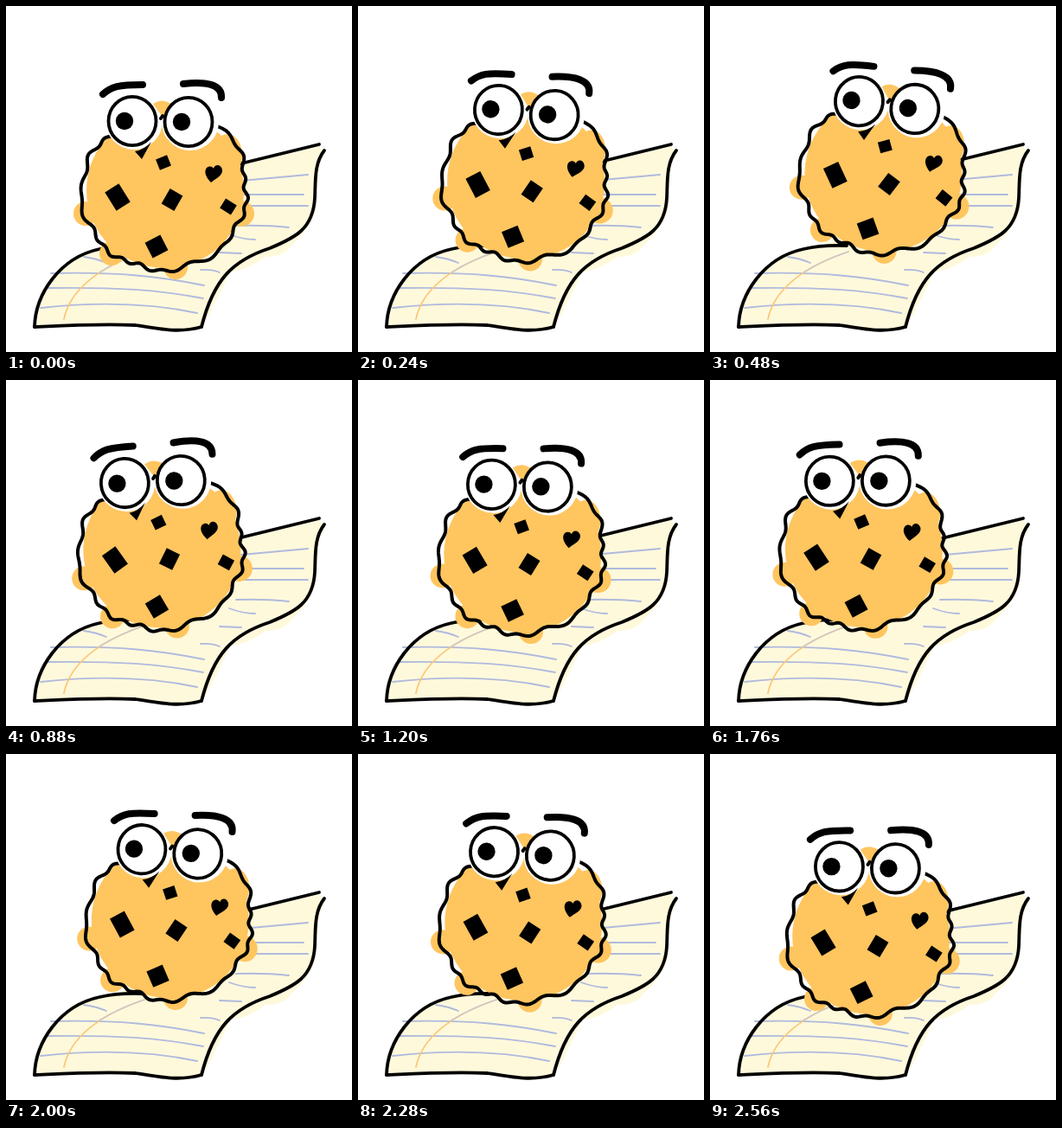
Write an HTML page with a canvas that moves like this. It is 400 px wide and 400 px high and loops after 2.6 s.

```html
<!DOCTYPE html>
<html lang="en">
<head>
<meta charset="utf-8">
<title>Dancing cookie</title>
<style>
  html, body { margin: 0; width: 100%; height: 100%; overflow: hidden; background: #fff; }
  canvas { display: block; width: 100vmin; height: 100vmin; }
</style>
</head>
<body>
<canvas id="stage" width="400" height="400"></canvas>
<script>
const ctx = document.getElementById('stage').getContext('2d');
const LOOP = 2600, STEP = 40, RAD = Math.PI / 180;
const INK = '#000', DOUGH = '#ffc55f', PAPER = '#fff9dc', RULE = '#b0badd', MARGIN = '#fbc878';
const PIVOT = { x: 192, y: 224 };

const poses = [
  { t: 0, x: 192, y: 224, tilt: 0 },
  { t: 480, x: 207, y: 206, tilt: 7 },
  { t: 880, x: 189, y: 207, tilt: -3.6 },
  { t: 1200, x: 198, y: 213, tilt: 1.5 },
  { t: 1520, x: 200, y: 206, tilt: -6.4 },
  { t: 1740, x: 186, y: 207, tilt: -1.5 },
  { t: 2000, x: 197, y: 204, tilt: 3.7 },
  { t: 2240, x: 199, y: 205, tilt: 3.2 },
  { t: 2560, x: 194, y: 222, tilt: 0.9 }
];

function keyPose(i) {
  const turn = Math.floor(i / poses.length);
  const pose = poses[i - turn * poses.length];
  return { ...pose, t: pose.t + turn * LOOP };
}

// Smooth closed curve through the poses
function poseAt(t) {
  const i = poses.findLastIndex(p => p.t <= t);
  const [a, b, c, d] = [i - 1, i, i + 1, i + 2].map(keyPose);
  const span = c.t - b.t, u = (t - b.t) / span;
  const blend = k => {
    const m0 = (c[k] - a[k]) / (c.t - a.t) * span;
    const m1 = (d[k] - b[k]) / (d.t - b.t) * span;
    return b[k] + (c[k] - b[k]) * u * u * (3 - 2 * u)
      + u * (1 - u) * ((1 - u) * m0 - u * m1);
  };
  return { x: blend('x'), y: blend('y'), tilt: blend('tilt') };
}

const path = d => new Path2D(d);

function stroke(shape, width, color = INK) {
  ctx.lineWidth = width;
  ctx.strokeStyle = color;
  ctx.stroke(shape);
}

function fill(shape, color = INK) {
  ctx.fillStyle = color;
  ctx.fill(shape);
}

function oval(x, y, rx, ry = rx) {
  const p = new Path2D();
  p.ellipse(x, y, rx, ry, 0, 0, Math.PI * 2);
  return p;
}

// Wavy rim, open at the top behind the eyes
function makeCrust() {
  const p = new Path2D();
  for (let deg = -53; deg <= 229; deg++) {
    const a = deg * RAD;
    const shoulder = 10 * Math.max(0, Math.cos(a + 53 * RAD)) ** 6;
    const wave = 2 * Math.sin(20 * a + 2 * Math.sin(3 * a)) + 1.8 * Math.sin(9 * a);
    const swell = shoulder + wave;
    p.lineTo(182 + (95 + swell) * Math.cos(a), 216 + (89 + swell) * Math.sin(a));
  }
  return p;
}

function chip(x, y, w, h, deg) {
  ctx.save();
  ctx.translate(x, y);
  ctx.rotate(deg * RAD);
  ctx.fillStyle = INK;
  ctx.fillRect(-w / 2, -h / 2, w, h);
  ctx.restore();
}

const sheet = path('M34 371C34 333 62 288 112 280C170 274 215 196 272 183L362 162L369 170' +
  'C356 190 362 222 357 240Q348 262 330 277Q322 290 300 290Q282 304 259 308Q246 336 227 372' +
  'Q205 378 180 373Q150 367 34 371Z');
const sheetEdges = [
  path('M33 371C34 333 62 291 108 281Q128 276 158 277'),
  path('M268 183L362 160'),
  path('M368 167C356 182 358 203 357 222C355 258 334 268 305 280C262 294 240 316 226 371'),
  path('M33 371C75 369 110 367 150 369C180 374 202 378 226 371')
];
const rules = path('M90 290Q105 292 116 297M52 309C130 307 180 313 229 323' +
  'M48 326C130 325 175 328 228 338M40 349C95 343 160 342 221 355' +
  'M225 305Q238 304 247 308M272 202L349 195M270 218L344 218M270 231L349 231' +
  'M266 254Q300 253 327 256M258 264Q274 270 288 270M247 285L272 286');
const marginLine = path('M67 362C74 328 105 303 160 284');
const marginShade = path('M108 308Q130 294 160 284');

const crust = makeCrust();
const dough = [
  oval(184, 213, 91, 90), oval(92, 240, 14), oval(122, 286, 14),
  oval(272, 240, 15), oval(196, 302, 14), oval(256, 172, 17, 24)
];
const bridge = path('M170 113Q180 106 191 113L182 130Z');
const crumb = path('M149 168Q160 166 168 157L157 177Z');
const heart = path('M237 204C232 199 228 192 232 187C236 184 239 186 240 188' +
  'C241 183 248 182 250 189C251 196 243 199 237 204Z');
const brows = [
  path('M112 102C122 93 130 91 158 91'),
  path('M205 90C230 87 250 90 249 106')
];
const eyes = [{ x: 146, y: 133, gaze: -9 }, { x: 211, y: 134, gaze: -8 }];

function drawSheet() {
  fill(sheet, PAPER);
  stroke(rules, 1.8, RULE);
  stroke(marginLine, 1.8, MARGIN);
  stroke(marginShade, 1.8, '#cdc8cc');
  sheetEdges.forEach(edge => stroke(edge, 3.8));
}

function drawEye({ x, y, gaze }) {
  const ball = oval(x, y, 27.5, 28.2);
  fill(ball, '#fff');
  stroke(ball, 3.8);
  fill(oval(x + gaze, y, 10.2));
}

function drawCookie() {
  dough.forEach(lump => fill(lump, DOUGH));
  stroke(crust, 4);
  chip(129, 221, 19, 25, -32);
  chip(192, 224, 17, 20, 30);
  chip(174, 278, 20, 20, -27);
  chip(182, 181, 14, 13, -22);
  chip(257, 232, 15, 13, 32);
  fill(heart);
  eyes.forEach(({ x, y }) => fill(oval(x + 2, y, 33), '#fff'));
  fill(bridge, DOUGH);
  fill(crumb);
  stroke(path('M179 130L181 127'), 4);
  eyes.forEach(drawEye);
  brows.forEach(brow => stroke(brow, 8));
}

function draw(time) {
  const { x, y, tilt } = poseAt(Math.floor((time % LOOP) / STEP) * STEP);
  ctx.fillStyle = '#fff';
  ctx.fillRect(0, 0, 400, 400);
  ctx.lineCap = ctx.lineJoin = 'round';
  drawSheet();
  ctx.save();
  ctx.translate(x, y);
  ctx.rotate(tilt * RAD);
  ctx.translate(-PIVOT.x, -PIVOT.y);
  drawCookie();
  ctx.restore();
}

const start = performance.now();
function tick() {
  draw(performance.now() - start);
  requestAnimationFrame(tick);
}
tick();
</script>
</body>
</html>
```
